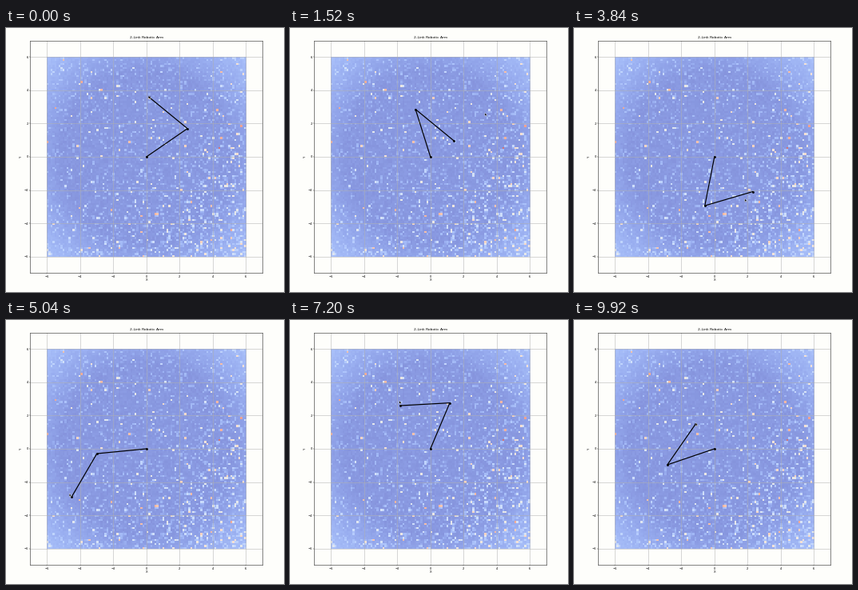
Write a matplotlib script that moves like this. It is 348 by 330 pixels and loops after 10 s.

```python
import numpy as np
import matplotlib.pyplot as plt
from matplotlib.animation import FuncAnimation
from matplotlib.patches import Polygon

W, H, DPI = 348, 330, 64
PT = 72 / DPI            # points per pixel
UNIT = 20.75             # pixels per data unit
LINK = 3.0
FLIP_RADIUS = 2.15       # closer than this the elbow bends the other way
MIN_BEND = np.radians(3.5)
FRAMES, STEP_MS = 125, 80
PAPER = "#fefefb"

# Key points of the pointer's wandering: frame, x, y
KEYS = np.array([
    (0, 0.15, 3.6), (5, -2.15, 4.55), (10, 0.7, 3.2), (18, 1.42, 0.96),
    (19, 3.28, 2.58), (26, 1.4, 2.85), (31, 3.0, -0.28), (35, 2.5, -1.9),
    (42, 2.9, 0.95), (47, 2.3, -2.1), (52, -1.0, -3.95), (55, 2.2, -0.9),
    (57, 1.7, 2.6), (59, -1.2, 4.5), (62, -4.5, -2.88), (69, -5.1, -0.1),
    (75, -4.4, 1.0), (83, -4.4, -1.95), (89, -1.83, 2.6), (103, -5.0, 4.6),
    (107, -4.43, 5.16), (121, -1.0, 2.05), (123, -1.13, 1.5),
])


def pointer_at(t):
    """Monotone cubic path through the key points."""
    x, y = KEYS[:, 0], KEYS[:, 1:]
    t = np.clip(t, x[0], x[-1])
    h = np.diff(x)[:, None]
    d = np.diff(y, axis=0) / h
    same = d[:-1] * d[1:] > 0
    total = np.where(same, d[:-1] + d[1:], 1)
    slope = np.zeros_like(y)
    slope[1:-1] = np.where(same, 2 * d[:-1] * d[1:] / total, 0)
    i = min(np.searchsorted(x, t, side="right") - 1, len(x) - 2)
    s = (t - x[i]) / h[i]
    return (y[i] * (1 + 2 * s) * (1 - s) ** 2 + y[i + 1] * s * s * (3 - 2 * s)
            + h[i] * s * (1 - s) * (slope[i] * (1 - s) - slope[i + 1] * s))


def arm_joints(target):
    """Inverse kinematics: base, elbow and tip for a target point."""
    x, y = target
    r = np.hypot(x, y)
    bend = max(np.arccos(min(r / (2 * LINK), 1)), MIN_BEND)
    side = -1 if r < FLIP_RADIUS else 1
    angles = np.arctan2(y, x) + side * bend * np.array([-1, 1])
    return (np.r_[0, np.cumsum(LINK * np.cos(angles))],
            np.r_[0, np.cumsum(LINK * np.sin(angles))])


def error_map(n=100):
    rng = np.random.default_rng(7)
    c = (np.arange(n) + 0.5) * 12 / n - 6
    x, y = np.meshgrid(c, c)
    bias = 1 / (1 + np.exp(-(0.55 * x - 0.6 * y - 2.2)))
    err = 0.035 + 0.03 * rng.random((n, n))
    err += 0.045 * np.clip(np.hypot(x, y) - 5.2, 0, None)
    soft = rng.random((n, n)) < 0.14 + 0.14 * bias
    err += soft * rng.uniform(0.02, 0.14, (n, n))
    spike = rng.random((n, n)) < 0.012 + 0.09 * bias
    err += spike * rng.uniform(0.12, 0.48, (n, n))
    hot = rng.random((n, n)) < 0.004 + 0.004 * bias
    err += hot * rng.uniform(0.45, 0.75, (n, n))
    return np.clip(err, 0, 1)


def label(x, y, text, size, **kw):
    fig.text(x / W, 1 - y / H, text, fontsize=size * PT,
             ha="center", va="center", **kw)


LEFT, RIGHT, TOP, BOTTOM = 30.4, 321.2, 15.7, 306.3
fig = plt.figure(figsize=(W / DPI, H / DPI), dpi=DPI, facecolor=PAPER)
ax = fig.add_axes([LEFT / W, 1 - BOTTOM / H,
                   (RIGHT - LEFT) / W, (BOTTOM - TOP) / H])
ax.set_facecolor(PAPER)
ax.imshow(error_map(), extent=(-6, 6, -6, 6), origin="lower", cmap="coolwarm",
          vmin=0, vmax=1, alpha=0.65, interpolation="nearest", aspect="auto")
ticks = range(-6, 7, 2)
ax.set(xlim=(-7, 7), ylim=(-7, 7), xticks=ticks, yticks=ticks)
ax.grid(color="#b0b0b0", lw=0.5 * PT)
ax.tick_params(length=1.3 * PT, width=0.4 * PT, pad=1.3 * PT,
               labelsize=3.7 * PT)
for spine in ax.spines.values():
    spine.set(linewidth=0.6 * PT, color="#333333")

label(175.8, 12.2, "2-Link Robotic Arm", 4.45)
label(175.8, 315.3, "X", 3.7)
label(18.5, 161, "Y", 3.7, rotation=90)

arm, = ax.plot([], [], "o-", color="black", lw=1.2 * PT, ms=2.8 * PT,
               mew=0, zorder=5)
ARROW = np.array([(0, 1.5), (0, -2.6), (0.9, -1.8), (1.6, -3),
                  (2.1, -2.7), (1.6, -1.5), (2.8, -1.4)]) / UNIT
pointer = Polygon(ARROW, closed=True, fc="black", ec="white",
                  lw=0.35 * PT, zorder=6)
ax.add_patch(pointer)


def draw(frame):
    # The arm reacts one step behind the pointer.
    arm.set_data(*arm_joints(pointer_at(frame - 1)))
    pointer.set_xy(ARROW + pointer_at(frame))
    return arm, pointer


anim = FuncAnimation(fig, draw, frames=FRAMES, interval=STEP_MS,
                     repeat=True, repeat_delay=0)
plt.show()
```
